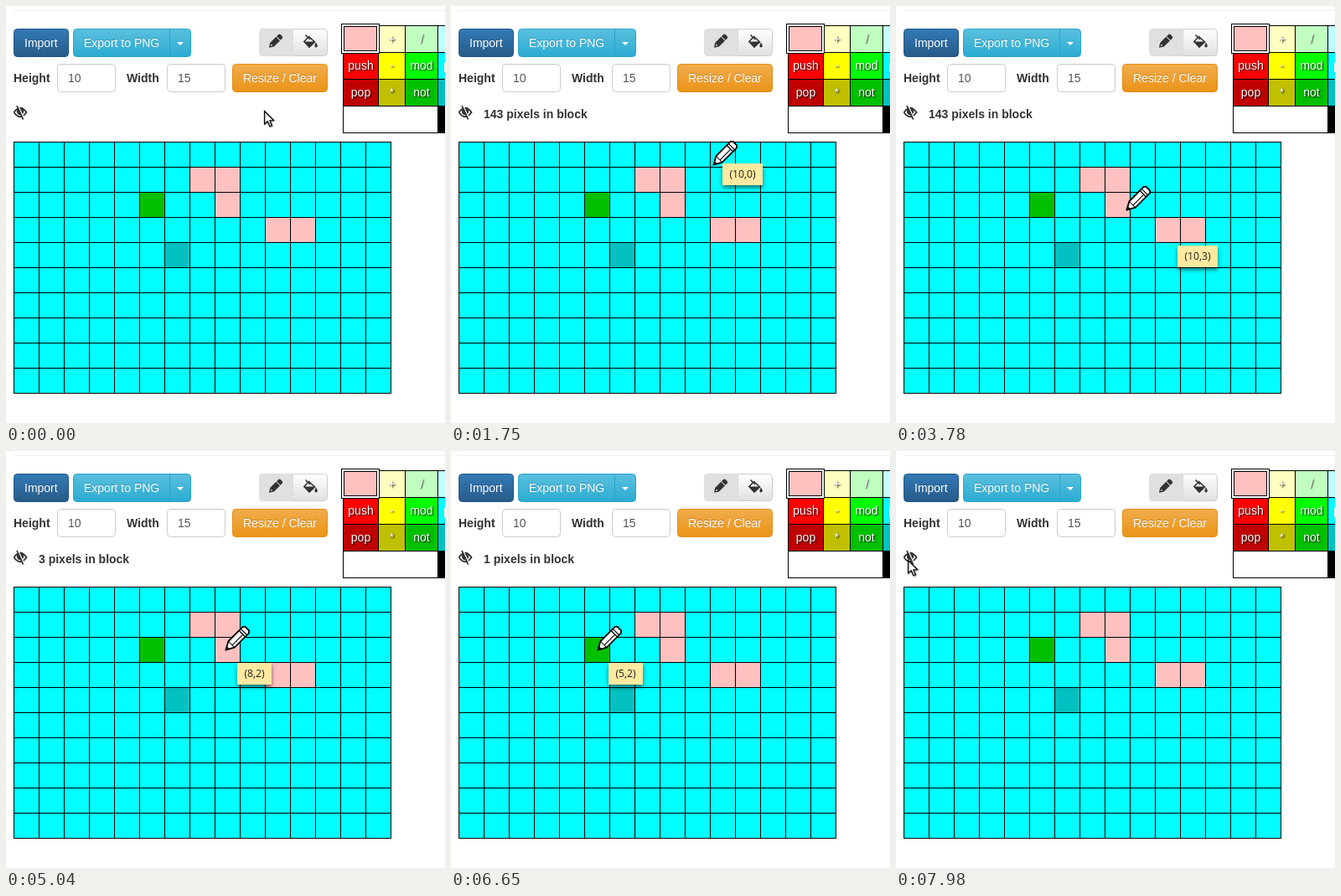
Recreate the animation shown at these times as an HTML page with a canvas. Size 524x498 px, loop 8 s.

```html
<!DOCTYPE html>
<html lang="en">
<head>
<meta charset="utf-8">
<title>Block editor</title>
<style>
  html, body { margin: 0; width: 100%; height: 100%; overflow: hidden; background: #fff; }
  canvas { display: block; }
</style>
</head>
<body>
<canvas id="stage" width="524" height="498"></canvas>
<script>
const ctx = document.getElementById('stage').getContext('2d');
const LOOP = 8000, STEP = 70, TIP_DELAY = 350;
const SANS = '"Liberation Sans", Arial, sans-serif';
const BOLD = 'bold 14px ' + SANS;
const DARK = '#333', PINK = '#ffc0c0', GREEN = '#00c000', TEAL = '#00c0c0', CYAN = '#00ffff';
const GRID = { x: 9, y: 162, size: 30, cols: 15, rows: 10 };
const painted = {
  '7,1': PINK, '8,1': PINK, '8,2': PINK, '10,3': PINK, '11,3': PINK, '5,2': GREEN, '6,4': TEAL
};

const glide = k => k < .5 ? 4 * k ** 3 : 1 - 4 * (1 - k) ** 3;
const accelerate = k => k * k;
const settle = k => 1 - (1 - k) ** 2;

const home = { x: 308, y: 125 };
const moves = [
  { start: 490, end: 980, x: 311, y: 173, ease: glide },
  { start: 1400, end: 2170, x: 320, y: 255, ease: accelerate },
  { start: 2170, end: 2450, x: 323, y: 271, ease: settle },
  { start: 3290, end: 4060, x: 263, y: 238, ease: glide },
  { start: 4970, end: 5390, x: 205, y: 238, ease: glide },
  { start: 5670, end: 6300, x: 175, y: 238, ease: glide },
  { start: 6790, end: 7210, x: 98, y: 173, ease: accelerate },
  { start: 7210, end: 7980, x: 14, y: 130, ease: settle }
];

function pointerAt(t) {
  let { x, y } = home;
  for (const m of moves) {
    if (t <= m.start) break;
    const k = m.ease(Math.min(1, (t - m.start) / (m.end - m.start)));
    x += (m.x - x) * k;
    y += (m.y - y) * k;
  }
  return { x: Math.round(x), y: Math.round(y) };
}

function cellAt({ x, y }) {
  const c = Math.floor((x - GRID.x) / GRID.size), r = Math.floor((y - GRID.y) / GRID.size);
  return inGrid(c, r) ? [c, r] : null;
}

const inGrid = (c, r) => c >= 0 && r >= 0 && c < GRID.cols && r < GRID.rows;
const colorOf = (c, r) => painted[c + ',' + r] || CYAN;

function blockSize([c, r]) {
  const color = colorOf(c, r), seen = new Set(), queue = [[c, r]];
  while (queue.length) {
    const [a, b] = queue.pop(), key = a + ',' + b;
    if (!inGrid(a, b) || seen.has(key) || colorOf(a, b) !== color) continue;
    seen.add(key);
    queue.push([a + 1, b], [a - 1, b], [a, b + 1], [a, b - 1]);
  }
  return seen.size;
}

// The tooltip appears once the pointer has rested, and stays until the next rest.
function restAt(t) {
  return moves.filter((m, i) => {
    const due = m.end + TIP_DELAY, next = moves[i + 1];
    return t >= due && next && next.start >= due;
  }).pop();
}

function rect(x, y, w, h, color) {
  ctx.fillStyle = color;
  ctx.fillRect(x, y, w, h);
}

function text(str, x, y, color, font = '14px ' + SANS, align = 'left') {
  ctx.font = font;
  ctx.textAlign = align;
  ctx.fillStyle = color;
  ctx.fillText(str, x, y);
}

function poly(points, fill, stroke, width = 1) {
  ctx.beginPath();
  points.forEach(([x, y]) => ctx.lineTo(x, y));
  ctx.closePath();
  if (fill) { ctx.fillStyle = fill; ctx.fill(); }
  if (stroke) { ctx.strokeStyle = stroke; ctx.lineWidth = width; ctx.stroke(); }
}

function line(x0, y0, x1, y1, color, width) {
  ctx.beginPath();
  ctx.moveTo(x0, y0);
  ctx.lineTo(x1, y1);
  ctx.strokeStyle = color;
  ctx.lineWidth = width;
  ctx.stroke();
}

function withShadow(color, blur, dx, dy, draw) {
  ctx.save();
  ctx.shadowColor = color;
  ctx.shadowBlur = blur;
  ctx.shadowOffsetX = dx;
  ctx.shadowOffsetY = dy;
  draw();
  ctx.restore();
}

function box(x, y, w, h, [top, bottom, border], radii = 4) {
  const fill = ctx.createLinearGradient(0, y, 0, y + h);
  fill.addColorStop(0, top);
  fill.addColorStop(1, bottom);
  ctx.beginPath();
  ctx.roundRect(x + .5, y + .5, w - 1, h - 1, radii);
  ctx.fillStyle = fill;
  ctx.fill();
  ctx.strokeStyle = border;
  ctx.lineWidth = 1;
  ctx.stroke();
}

function label(str, x, y) {
  withShadow('rgba(0,0,0,.2)', 0, 0, -1, () => text(str, x, y, '#fff'));
}

function field(name, nameX, x, value) {
  text(name, nameX, 91, DARK, BOLD);
  box(x, 69, 70, 34, ['#fff', '#fff', '#ccc']);
  rect(x + 3, 70, 64, 1, '#f0f0f0');
  text(value, x + 13, 91, '#555');
}

function pencilIcon() {
  ctx.save();
  ctx.translate(314, 49.8);
  ctx.rotate(-Math.PI / 4);
  poly([[0, 0], [5, -3.3], [15, -3.3], [15, 3.3], [5, 3.3]], DARK);
  poly([[2.6, 0], [5, -1.2], [5, 1.2]], '#e0e0e0');
  ctx.beginPath();
  ctx.roundRect(16, -3.3, 4.8, 6.6, [0, 2, 2, 0]);
  ctx.fillStyle = DARK;
  ctx.fill();
  ctx.restore();
}

function bucketIcon() {
  poly([[361.5, 36.5], [368.5, 43], [362, 49], [355.8, 42.5]], null, DARK, 1.6);
  poly([[355.5, 42.5], [369, 42.5], [362, 50]], DARK);
  line(357.5, 34.5, 363, 40, DARK, 1.6);
  ctx.beginPath();
  ctx.moveTo(370, 43.5);
  ctx.quadraticCurveTo(373.5, 49, 370, 49.5);
  ctx.quadraticCurveTo(366.8, 49, 370, 43.5);
  ctx.fillStyle = DARK;
  ctx.fill();
}

function eyeIcon() {
  ctx.beginPath();
  ctx.moveTo(9.5, 127);
  ctx.quadraticCurveTo(17, 116.5, 24.5, 127);
  ctx.quadraticCurveTo(17, 137.5, 9.5, 127);
  ctx.strokeStyle = DARK;
  ctx.lineWidth = 1.8;
  ctx.stroke();
  ctx.beginPath();
  ctx.arc(17, 126, 4.2, 0, 7);
  ctx.fillStyle = DARK;
  ctx.fill();
  line(14.5, 119, 22, 135.5, '#fff', 1.5);
  line(13, 119, 20.5, 135.5, DARK, 1.8);
}

function drawToolbar() {
  const blue = ['#337ab7', '#265a88', '#245580'], sky = ['#5bc0de', '#2aabd2', '#28a4c9'];
  const left = [4, 0, 0, 4], right = [0, 4, 4, 0];
  rect(9, 5, 515, 1, '#eee');
  box(9, 27, 66, 34, blue);
  label('Import', 22, 49);
  box(80, 27, 116, 34, sky, left);
  label('Export to PNG', 93, 49);
  box(195, 27, 26, 34, sky, right);
  poly([[204, 43], [212, 43], [208, 47]], '#fff');
  box(342, 27, 42, 33, ['#fff', '#e0e0e0', '#ccc'], right);
  box(302, 27, 41, 33, ['#e0e0e0', '#e0e0e0', '#dbdbdb'], left);
  pencilIcon();
  bucketIcon();
  field('Height', 9, 61, '10');
  field('Width', 144, 192, '15');
  box(270, 69, 114, 34, ['#f0ad4e', '#eb9316', '#e38d13']);
  label('Resize / Clear', 283, 91);
  eyeIcon();
}

function drawPalette() {
  const edges = [402, 444, 476, 515, 571];
  const rows = [
    [[PINK, ''], ['#ffffc0', '+'], ['#c0ffc0', '/'], ['#c0ffff', '>']],
    [['#f00', 'push'], ['#ff0', '-'], ['#0f0', 'mod'], [CYAN, 'pointer']],
    [['#c00000', 'pop'], ['#c0c000', '*'], [GREEN, 'not'], [TEAL, 'switch']]
  ];
  rect(402, 23, 122, 129, '#000');
  rows.forEach((row, r) => row.forEach(([color, name], c) => {
    const x = edges[c] + 1, y = 24 + r * 32, w = edges[c + 1] - x;
    rect(x, y, w, 31, color);
    withShadow('#000', 2, 1, 1, () => text(name, x + w / 2, y + 20, '#fff', undefined, 'center'));
  }));
  rect(403, 120, 112, 31, '#fff');
  ctx.lineWidth = 1;
  ['#000', '#fff', '#fff', '#000'].forEach((color, i) => {
    ctx.strokeStyle = color;
    ctx.strokeRect(400.5 + i, 21.5 + i, 45 - 2 * i, 35 - 2 * i);
  });
}

function drawGrid() {
  const { x, y, size, cols, rows } = GRID;
  const w = cols * size + 1, h = rows * size + 1;
  rect(x, y, w, h, '#000');
  for (let c = 0; c < cols; c++) {
    for (let r = 0; r < rows; r++) {
      rect(x + c * size + 1, y + r * size + 1, size - 1, size - 1, colorOf(c, r));
    }
  }
}

function drawTip(rest) {
  const str = `(${cellAt(rest)})`, w = str.length * 7 + 6;
  const x = rest.x + 13, y = rest.y + 15;
  withShadow('rgba(0,0,0,.55)', 5, 0, 3, () => rect(x, y, w, 26, '#fee9a0'));
  text(str, x + w / 2, y + 17, '#222', '12.2px "Open Sans", "Noto Sans", sans-serif', 'center');
}

function drawArrow() {
  withShadow('rgba(0,0,0,.3)', 2, 1, 1, () =>
    poly([[.5, .5], [.5, 16], [4.2, 12.7], [6.8, 18.8], [9.4, 17.7], [6.8, 11.8], [11.5, 11.5]], '#fff', '#000', 1.2));
}

function drawPencil() {
  const half = 5.2, neck = 10, end = 36.5;
  ctx.rotate(-Math.PI / 4);
  ctx.lineJoin = 'round';
  poly([[.5, 0], [neck, -half], [end - 2, -half], [end, 2 - half], [end, half - 2], [end - 2, half], [neck, half]],
    '#fff', '#000', 1.8);
  poly([[0, 0], [4.5, -2.4], [4.5, 2.4]], '#000');
  line(neck, -half, neck, half, '#000', 1);
  line(neck, 1.4, 28, 1.4, '#000', 1.1);
  line(28, -half, 28, half, '#000', 1.4);
  line(31, -half, 31, half, '#000', 1.1);
}

function render(now) {
  const t = Math.floor((now % LOOP) / STEP) * STEP;
  const pointer = pointerAt(t), inside = cellAt(pointer);
  const hovered = cellAt(pointerAt(t - STEP)); // the counter trails the pointer by a step
  const rest = restAt(t);
  rect(0, 0, 524, 498, '#fff');
  drawToolbar();
  drawPalette();
  drawGrid();
  if (hovered) text(blockSize(hovered) + ' pixels in block', 39, 134, DARK, BOLD);
  if (inside && rest) drawTip(rest);
  ctx.save();
  ctx.translate(pointer.x, pointer.y);
  if (inside) drawPencil(); else drawArrow();
  ctx.restore();
}

const start = performance.now();
function tick() {
  render(performance.now() - start);
  requestAnimationFrame(tick);
}
tick();
</script>
</body>
</html>
```
